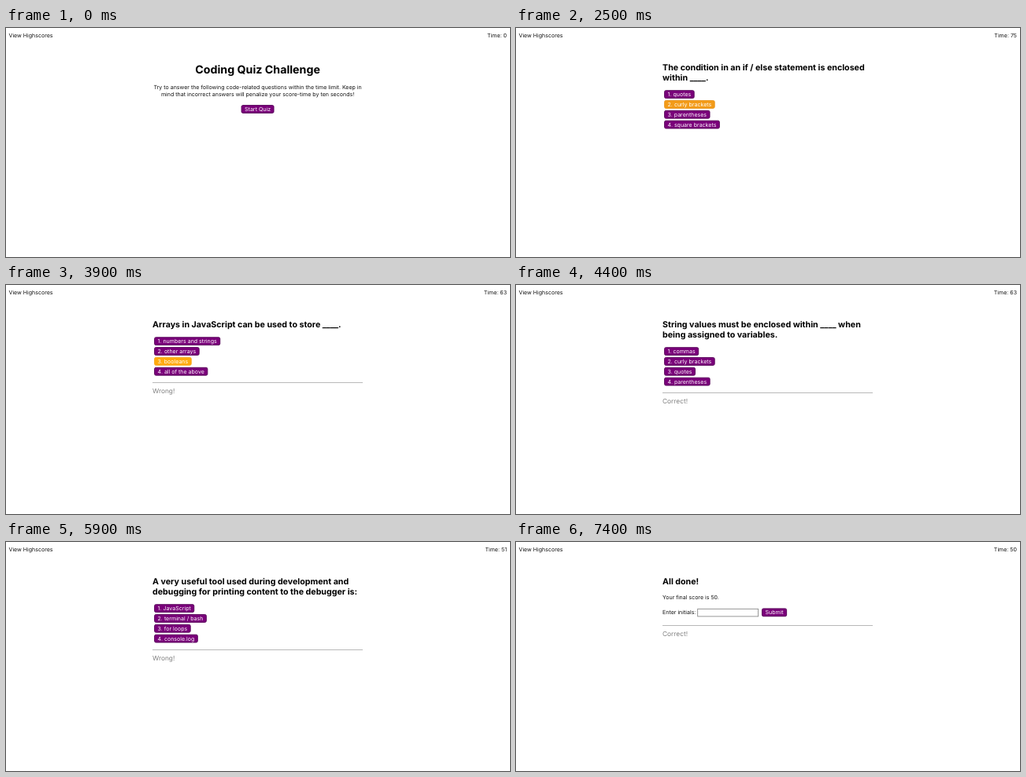
Animation of 640 by 292 pixels, one loop 8000 ms. Source, as an HTML page:

```html
<!DOCTYPE html>
<html lang="en">
<head>
<meta charset="utf-8">
<title>Coding Quiz Challenge</title>
<style>
  html, body { margin: 0; width: 100%; height: 100%; overflow: hidden; background: #fff; }
  svg { display: block; width: 100%; height: 100%; }
  text {
    font: 400 15.85px Inter, "Liberation Sans", sans-serif;
    text-rendering: geometricPrecision;
    white-space: pre;
    fill: #111;
  }
  .h1 { font-size: 32px; font-weight: 700; fill: #000; }
  .h2 { font-size: 24px; font-weight: 700; fill: #000; }
  .result { font-size: 18.72px; fill: #808080; }
  .label { fill: #fff; }
  .mid { text-anchor: middle; }
  .end { text-anchor: end; }
</style>
</head>
<body>
<svg id="stage" viewBox="0 0 1440 657" preserveAspectRatio="none"></svg>
<script>
const LOOP = 8000, FADE = 150, LEFT = 418.6, LINE = 29.05;
const START = 1800, DONE = 7200;
const IDLE = { fill: [122, 0, 122], edge: [84, 0, 86] };
const HOT = { fill: [255, 170, 14], edge: [248, 166, 24] };

const stage = document.getElementById("stage");

function add(parent, tag, attrs, content) {
  const el = document.createElementNS("http://www.w3.org/2000/svg", tag);
  for (const key in attrs) el.setAttribute(key, attrs[key]);
  if (content) el.textContent = content;
  parent.appendChild(el);
  return el;
}

const write = (parent, x, y, content, cls = "") =>
  add(parent, "text", { x, y, class: cls }, content);

// A button is as wide as its label plus padding.
function addButton(parent, x, y, content, centered) {
  const g = add(parent, "g", {});
  const rect = add(g, "rect", { y: y + 1, height: 22.2, rx: 4, "stroke-width": 2 });
  const label = write(g, 0, y + 17.7, content, "label");
  const width = label.getComputedTextLength() + 20;
  const left = centered ? x - width / 2 : x;
  rect.setAttribute("x", left + 1);
  rect.setAttribute("width", width - 2);
  label.setAttribute("x", left + 10);
  return rect;
}

function addResult(parent, y, content) {
  const g = add(parent, "g", {});
  add(g, "rect", { x: LEFT, y, width: 600.6, height: 2, fill: "#b0b0b0" });
  write(g, LEFT, y + 30.8, content, "result");
  return g;
}

function intro() {
  const g = add(stage, "g", {});
  write(g, 719, 131.3, "Coding Quiz Challenge", "h1 mid");
  write(g, 719, 176.6, "Try to answer the following code-related questions within the time limit. Keep in", "mid");
  write(g, 719, 196, "mind that incorrect answers will penalize your score-time by ten seconds!", "mid");
  return { g, buttons: [addButton(g, 719, 220.8, "Start Quiz", true)] };
}

function question(heading, answers, verdict) {
  const g = add(stage, "g", {});
  heading.forEach((line, i) => write(g, LEFT, 122.4 + i * LINE, line, "h2"));
  const shift = (heading.length - 1) * LINE;
  const buttons = answers.map((answer, i) =>
    addButton(g, 423.3, 149.2 + shift + i * 28.9, `${i + 1}. ${answer}`));
  return { g, buttons, result: verdict && addResult(g, 279.2 + shift, verdict) };
}

function summary() {
  const g = add(stage, "g", {});
  write(g, LEFT, 122.4, "All done!", "h2");
  write(g, LEFT, 164.4, "Your final score is 50.");
  write(g, LEFT, 207.6, "Enter initials:");
  add(g, "rect", { x: 519, y: 192, width: 173, height: 21.5, fill: "#fff", stroke: "#8a8a8a", "stroke-width": 2 });
  const buttons = [addButton(g, 702, 190, "Submit")];
  return { g, buttons, result: addResult(g, 238.6, "Correct!") };
}

write(stage, 8, 26, "View Highscores");
const clock = write(stage, 1431, 26, "", "end");

// hover: [time, button index] pairs; the pointer stays until the next pair.
const scenes = [
  { at: 0, hover: [[1673, 0]], ...intro() },
  { at: START, hover: [[2405, 1], [2600, 2], [2700, 3]],
    ...question(["The condition in an if / else statement is enclosed", "within ____."],
      ["quotes", "curly brackets", "parentheses", "square brackets"]) },
  { at: 3100, penalty: 10, hover: [[3600, 1], [3760, 2], [3990, 3]],
    ...question(["Arrays in JavaScript can be used to store ____."],
      ["numbers and strings", "other arrays", "booleans", "all of the above"], "Wrong!") },
  { at: 4400, hover: [[4400, 2], [5030, 1], [5400, 2], [5480, 1]],
    ...question(["String values must be enclosed within ____ when", "being assigned to variables."],
      ["commas", "curly brackets", "quotes", "parentheses"], "Correct!") },
  { at: 5900, penalty: 10, hover: [[5900, 1], [6300, 2], [6420, 3]],
    ...question(["A very useful tool used during development and", "debugging for printing content to the debugger is:"],
      ["JavaScript", "terminal / bash", "for loops", "console.log"], "Wrong!") },
  { at: DONE, hover: [], ...summary() }
];

// CSS "ease": cubic-bezier(.25, .1, .25, 1)
function ease(x) {
  if (x >= 1) return 1;
  const bezier = (a, b, s) => 3 * a * s * (1 - s) ** 2 + 3 * b * s * s * (1 - s) + s ** 3;
  let low = 0, high = 1;
  for (let i = 0; i < 20; i++) {
    const s = (low + high) / 2;
    if (bezier(0.25, 0.25, s) < x) low = s; else high = s;
  }
  return bezier(0.1, 1, low);
}

const mix = (a, b, k) => `rgb(${a.map((v, i) => Math.round(v + (b[i] - v) * k))})`;
const show = (el, on) => el.setAttribute("display", on ? "inline" : "none");

function timeLeft(t) {
  if (t < START) return 0;
  const ticks = Math.floor((Math.min(t, DONE) - START) / 1000);
  const lost = scenes.reduce((sum, s) => sum + (t >= s.at ? s.penalty || 0 : 0), 0);
  return 75 - ticks - lost;
}

function render(t) {
  const current = scenes.filter(s => t >= s.at).pop();
  for (const scene of scenes) show(scene.g, scene === current);
  if (current.result) show(current.result, t < current.at + 1000);

  // Entering a button fades in; leaving it is instant.
  const pointer = current.hover.filter(h => t >= h[0]).pop();
  current.buttons.forEach((rect, i) => {
    const k = pointer && pointer[1] === i ? ease((t - pointer[0]) / FADE) : 0;
    rect.setAttribute("fill", mix(IDLE.fill, HOT.fill, k));
    rect.setAttribute("stroke", mix(IDLE.edge, HOT.edge, k));
  });
  clock.textContent = `Time: ${timeLeft(t)}`;
}

function frame() {
  render(performance.now() % LOOP);
  requestAnimationFrame(frame);
}
frame();
</script>
</body>
</html>
```
